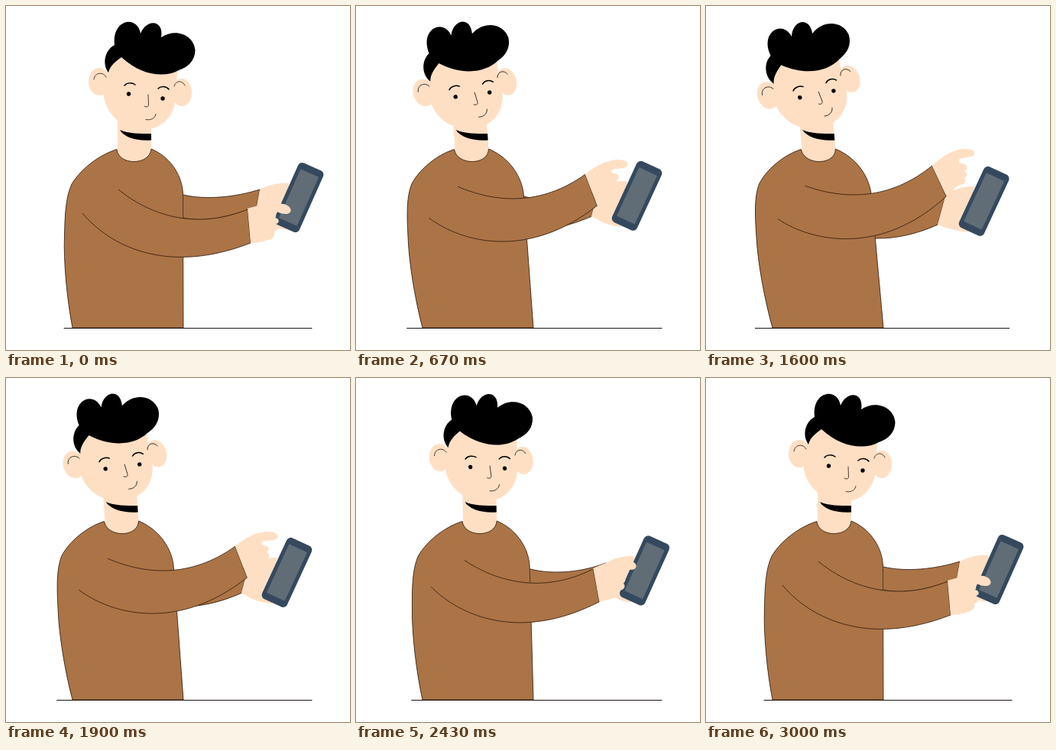
An HTML page for the animation above (3030 ms loop, 450x450 px).

```html
<!DOCTYPE html>
<html lang="en">
<head>
<meta charset="utf-8">
<title>Man with phone</title>
<style>
html, body { margin: 0; width: 100%; height: 100%; overflow: hidden; background: #fff; }
svg { display: block; width: 100%; height: 100%; }
.skin { fill: #ffdfc4; }
.cloth { fill: #ab7446; stroke: #2a190c; stroke-width: .8; }
.line { fill: none; stroke: #1c1410; stroke-width: .8; stroke-linecap: round; }
.brow { stroke: #000; stroke-width: 1.5; }
</style>
</head>
<body>
<svg viewBox="0 0 450 450">
  <g id="far">
    <path id="farArm" class="cloth"/>
    <path id="farHand" class="skin"/>
  </g>
  <g id="phone">
    <rect x="-18" y="-44" width="36" height="88" rx="6" fill="#35495e"/>
    <rect x="-13" y="-35" width="26" height="70" rx="1" fill="#606d77"/>
  </g>
  <g id="torso">
    <path class="skin" d="M146 150H190V206H146Z"/>
    <path d="M149 162C160 167 175 167 190 167V175.500C172 177 154 172 149 162Z"/>
    <path class="cloth" d="M87 421C80 385 75 335 76.500 300C77 274 78 250 86 233C97 214 121 195 145 187.500C147 209 188 209 190 187C212 196 230 218 231.500 245L232 421Z"/>
  </g>
  <path id="ground" class="line" style="stroke-width:1"/>
  <path id="nearArm" class="cloth"/>
  <path id="nearHand" class="skin"/>
  <g id="head">
    <g class="skin">
      <ellipse cx="122" cy="99" rx="14" ry="18"/>
      <ellipse cx="230" cy="113" rx="13" ry="18"/>
      <path d="M133 84C138 75 146 70 152 62L225 80C223 100 222 110 222 118C221 145 203 162 178 162C150 160 127 140 127 108Z"/>
    </g>
    <path d="M134 87C125 75 130 57 142 51C138 17 172 11 176 36C184 16 207 18 203 41C222 28 246 38 247.500 58C247 72 238 80 226 84C208 94 178 92 151 67C144 72 136 78 134 87Z"/>
    <path class="line" d="M115 96C116 86 128 86 131 93M220 105C222 97 231 97 234 104M186 116L186.500 129C186.500 132 184 133 181 131M183 148.500C189 150 195 147 196 141.500"/>
    <path id="brows" class="line brow" d="M155 104C158 100 165 100 169 103M199 108C203 104 210 105 213 109"/>
    <ellipse class="eye" cx="160.500" cy="115" rx="2.700"/>
    <ellipse class="eye" cx="205" cy="121" rx="2.700"/>
  </g>
</svg>
<script>
const LOOP = 3030, START = 40, PEAK = 1390, END = 2990;
const $ = id => document.getElementById(id);
const clamp = x => Math.max(0, Math.min(1, x));
const smooth = x => (x = clamp(x), x * x * (3 - 2 * x));
const set = (id, name, value) => $(id).setAttribute(name, value);

// Each shape: upright pose, leaning pose
const poses = {
  farArm: [
    "M232 247C262 254 300 250 332 240L328 262C305 272 262 285 232 277",
    "M215 257C250 268 290 263 313 247L302 287C275 299 250 305 221 305"],
  farHand: [
    "M332 240C345 233 358 231 370 232L368 292C350 294 340 280 328 262Z",
    "M313 247C325 239 338 236 350 236L342 296C325 294 315 291 302 287Z"],
  nearArm: [
    "M147 240C185 271 245 295 316 266L320 310C210 353 135 313 100 271",
    "M129 235C180 253 240 253 295 207L314 247C230 326 140 309 94 279"],
  nearHand: [
    "M316 265C326 262 338 258 348 258C354 258 358 258 363 259C376 262 375 273 365 272C358 272 354 268 351 268C350 270 350 272 351 272C354 272 354 277 351 277C358 277 359 285 352 285C358 286 358 294 351 295C353 300 348 306 342 306C335 309 326 310 320 310Z",
    "M295 207C305 198 315 190 326 187C334 184 338 184 343 185C353 185 353 194 344 195C337 196 332 197 330 199C329 202 330 203 334 204C343 204 343 213 336 214C343 215 342 223 336 223C341 224 339 232 331 232C326 234 323 238 321 240C319 242 316 244 314 246Z"]
};

function mix(a, b, u) {
  const to = b.match(/[\d.]+/g);
  let i = 0;
  return a.replace(/[\d.]+/g, n => (+n + (to[i++] - n) * u).toFixed(2));
}

// cubic-bezier(.25, .1, .25, 1)
function ease(x) {
  const curve = (p, q, s) => 3 * p * s * (1 - s) ** 2 + 3 * q * s * s * (1 - s) + s ** 3;
  let lo = 0, hi = 1;
  for (let i = 0; i < 24; i++) {
    const mid = (lo + hi) / 2;
    if (curve(.25, .25, mid) < x) lo = mid; else hi = mid;
  }
  return curve(.1, 1, lo);
}

function leanAt(t) {
  const out = ease(clamp((t - START) / (PEAK - START)));
  const back = (1 + Math.cos(Math.PI * clamp((t - PEAK) / (END - PEAK)))) / 2;
  return 1.01 * out * back;
}

function draw(now) {
  const t = now % LOOP, u = leanAt(t);
  const lift = -7 * (t < 400 ? smooth((t - START) / 360) : 1 - smooth((t - 400) / 1200));
  const blink = smooth(Math.min(t - 260, 480 - t) / 70);
  const phoneX = 383 - 20 * u;

  for (const id in poses) set(id, "d", mix(...poses[id], u));
  set("far", "transform", `translate(0 ${lift})`);
  set("phone", "transform", `translate(${phoneX} ${250.5 + 5 * u + lift}) rotate(${24 + u})`);
  set("torso", "transform", `matrix(1 0 ${.091 * u} 1 ${-.091 * 421 * u} 0)`);
  set("head", "transform", `translate(${-43 * u} 0) rotate(${-19.5 * u} 176.5 105.5)`);
  set("brows", "transform", `translate(0 ${9 * blink})`);
  set("ground", "d", `M${76 - 12 * u} 421.5H${Math.min(400, phoneX + 33)}`);
  for (const eye of document.querySelectorAll(".eye")) eye.setAttribute("ry", 2.7 * (1 - blink));
}

function tick() {
  draw(performance.now());
  requestAnimationFrame(tick);
}
tick();
</script>
</body>
</html>
```
